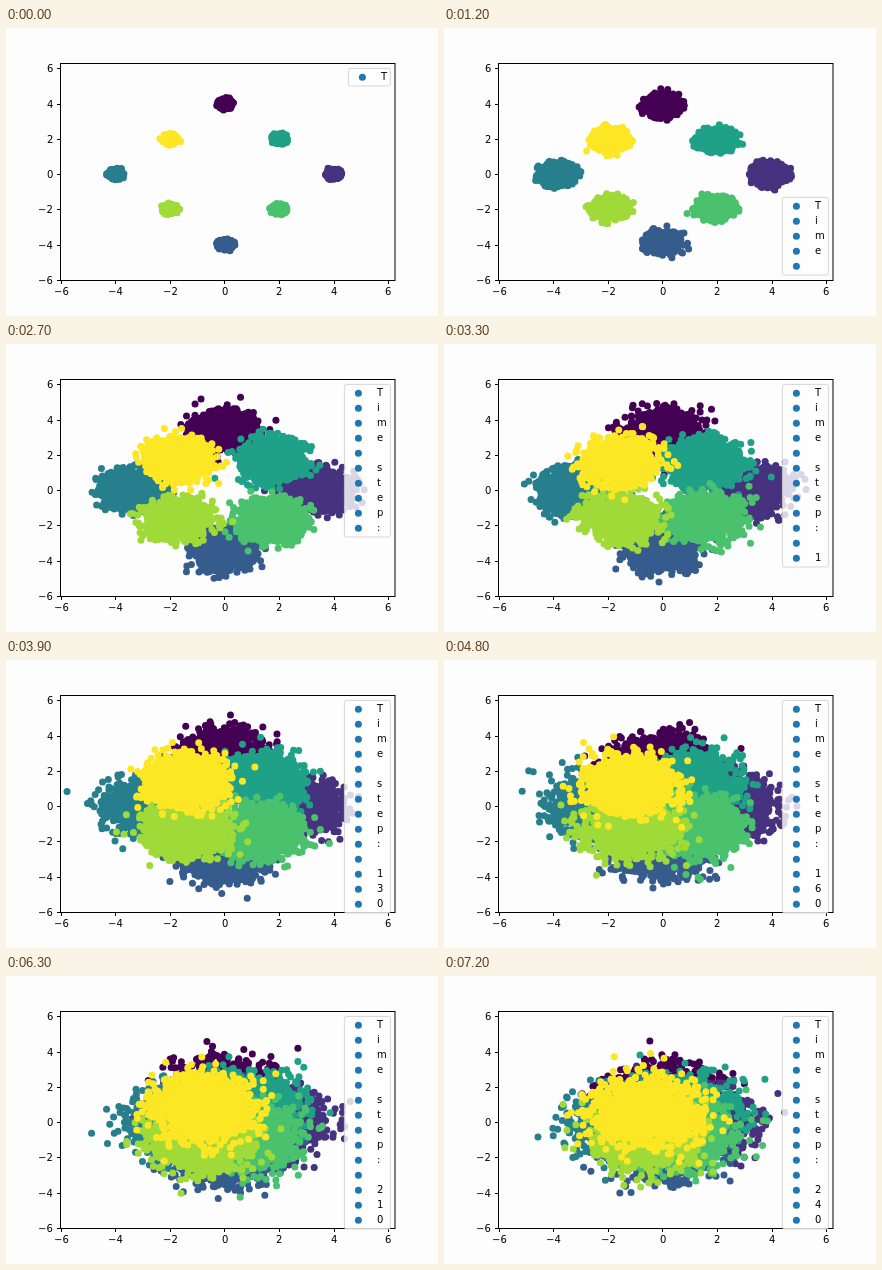
An HTML page with a canvas that plays this animation: 432 px wide and 288 px high, repeating every 7.5 s.

```html
<!DOCTYPE html>
<html lang="en">
<head>
<meta charset="utf-8">
<title>Diffusing clusters</title>
<style>
  html, body { margin: 0; width: 432px; height: 288px; overflow: hidden; background: #fdfdfd; }
  canvas { display: block; }
</style>
</head>
<body>
<canvas id="stage" width="432" height="288"></canvas>
<script>
const ctx = document.getElementById('stage').getContext('2d');
const PAPER = '#fdfdfd';
const FRAME_MS = 300, FRAMES = 25, PER_CLUSTER = 1500;
const AXES = { left: 54.5, top: 35.5, right: 389, bottom: 252.5 };

// centre x, centre y, colour; later clusters lie on top
const CLUSTERS = [
  [0, 4, '#440154'],
  [4, 0, '#46327e'],
  [0, -4, '#365c8d'],
  [-4, 0, '#277f8e'],
  [2, 2, '#1fa187'],
  [2, -2, '#4ac16d'],
  [-2, -2, '#a0da39'],
  [-2, 2, '#fde725']
];

const toX = v => 218.8 + 27.3 * v;
const toY = v => 146.1 - 17.6 * v;

function seeded(seed) {
  let s = seed >>> 0;
  return () => {
    s = (s + 0x6D2B79F5) >>> 0;
    let t = Math.imul(s ^ (s >>> 15), s | 1);
    t ^= t + Math.imul(t ^ (t >>> 7), t | 61);
    return ((t ^ (t >>> 14)) >>> 0) / 4294967296;
  };
}

function dot(x, y) {
  ctx.beginPath();
  ctx.arc(x, y, 3.5, 0, 2 * Math.PI);
  ctx.fill();
}

// Forward diffusion with a linear noise schedule
function drawClusters(k) {
  const step = 10 * k;
  const keep = Math.exp(-2e-5 * step * step);
  const sd = 0.95 * Math.sqrt(0.01 * keep * keep + 1 - keep * keep);
  const rand = seeded(977 + k * 7919);
  ctx.save();
  ctx.beginPath();
  ctx.rect(AXES.left, AXES.top, AXES.right - AXES.left, AXES.bottom - AXES.top);
  ctx.clip();
  for (const [cx, cy, colour] of CLUSTERS) {
    ctx.fillStyle = colour;
    for (let i = 0; i < PER_CLUSTER; i++) {
      const r = sd * Math.sqrt(-2 * Math.log(1 - rand()));
      const a = 2 * Math.PI * rand();
      dot(toX(cx * keep + r * Math.cos(a)), toY(cy * keep + r * Math.sin(a)));
    }
  }
  ctx.restore();
}

function drawAxes() {
  const { left, top, right, bottom } = AXES;
  ctx.strokeStyle = '#000';
  ctx.fillStyle = '#000';
  ctx.lineWidth = 1;
  ctx.font = '10px "DejaVu Sans", sans-serif';
  ctx.textAlign = 'left';
  ctx.strokeRect(left, top, right - left, bottom - top);
  ctx.beginPath();
  for (let v = -6; v <= 6; v += 2) {
    const label = String(v).replace('-', '\u2212');
    const w = ctx.measureText(label).width;
    const x = Math.floor(toX(v)) + 0.5, y = Math.round(toY(v)) + 0.5;
    ctx.moveTo(x, bottom);
    ctx.lineTo(x, bottom + 3.5);
    ctx.moveTo(left, y);
    ctx.lineTo(left - 3.5, y);
    ctx.fillText(label, Math.round(toX(v) - w / 2), 267);
    ctx.fillText(label, Math.round(47 - w), y + 3.5);
  }
  ctx.stroke();
}

function drawLegend(k) {
  const letters = [...('Time step: ' + 10 * k)].slice(0, k + 1);
  const width = k < 2 ? 42 : 46;
  const height = 17.6 + 15 * (letters.length - 1);
  const low = k === 4 || k === 8;
  const x = 384.4 - width, y = low ? 247 - height : 40.4;

  ctx.beginPath();
  ctx.roundRect(x, y, width, height, 2);
  ctx.fillStyle = 'rgba(255,255,255,0.8)';
  ctx.fill();
  ctx.strokeStyle = 'rgba(204,204,204,0.8)';
  ctx.stroke();

  letters.forEach((ch, i) => {
    const rowY = y + 8.8 + 15 * i;
    ctx.fillStyle = '#1f77b4';
    dot(x + 14, rowY);
    ctx.fillStyle = '#000';
    ctx.fillText(ch, Math.round(x + 32.2), Math.round(rowY + 3));
  });
}

function draw(k) {
  ctx.fillStyle = PAPER;
  ctx.fillRect(0, 0, 432, 288);
  drawClusters(k);
  drawAxes();
  drawLegend(k);
}

let shown = -1;
function tick() {
  const k = Math.floor(performance.now() / FRAME_MS) % FRAMES;
  if (k !== shown) draw(shown = k);
  requestAnimationFrame(tick);
}
tick();
</script>
</body>
</html>
```
